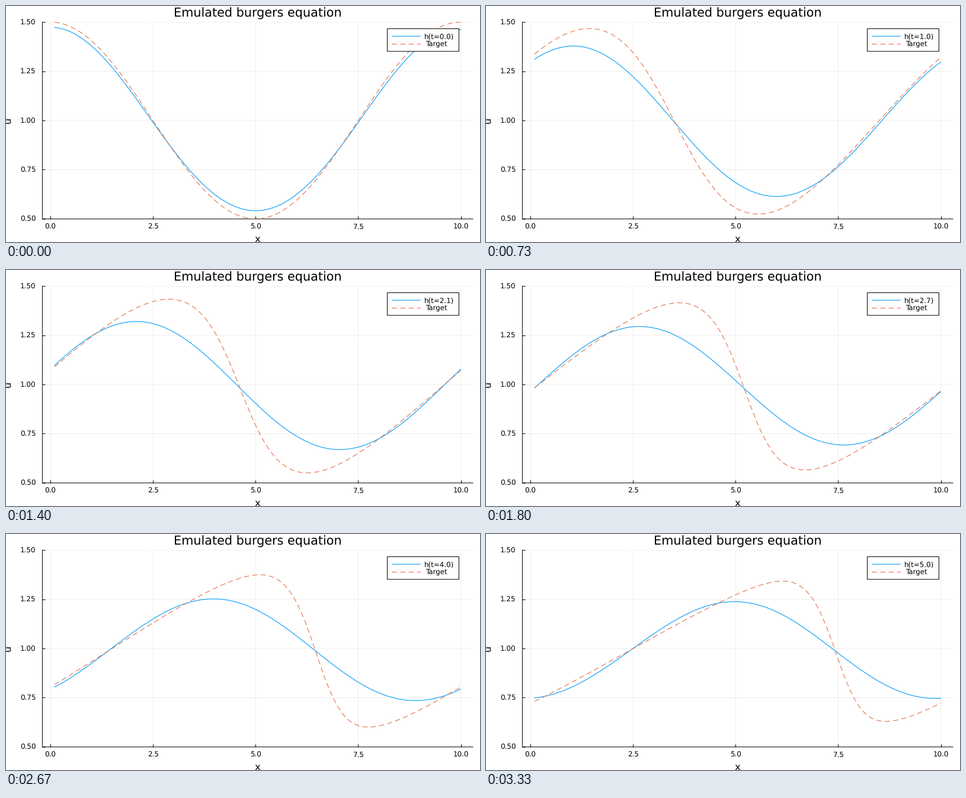
Recreate the animation shown at these times as a matplotlib script. Size 800 px wide and 400 px high, loop 3.39 s.

```python
import numpy as np
import matplotlib.pyplot as plt
from matplotlib.animation import FuncAnimation
from matplotlib.lines import Line2D
from matplotlib.patches import Rectangle
from matplotlib.transforms import Affine2D

W, H, DPI = 800, 400, 100
PX = 72 / DPI
LOOP_MS, FRAMES = 3390, 51
BLUE, ORANGE = "#009AFA", "#E36F47"
LEFT, RIGHT, TOP, BOTTOM = 61.4, 788.1, 27.2, 360.9
X_MIN, X_MAX = -0.197, 10.297
DASH = (0, (8, 4.9))

# Plain antialiased lines and glyphs, not aligned to the pixel grid
plt.rcParams.update({"font.family": "DejaVu Sans",
                     "path.snap": False,
                     "text.hinting": "none"})

DX = 0.1
x = DX * np.arange(1, 101)
k = 2 * np.pi / 10


def solve_burgers(nu=0.1, dt=0.002, substeps=50):
    """Periodic viscous Burgers equation, upwind advection."""
    u = 1 + 0.5 * np.cos(k * x)
    states = [u]
    for _ in range(FRAMES - 1):
        for _ in range(substeps):
            back, ahead = np.roll(u, 1), np.roll(u, -1)
            u = u + dt * (nu * (ahead - 2 * u + back) / DX**2
                          - u * (u - back) / DX)
        states.append(u)
    return states


# Emulated wave: mean, main harmonic and a weak second one, over time
KEYS = [0, 0.7, 1.5, 2.1, 3.3, 4, 5]
MEAN = [0.999, 0.9925, 0.9923, 0.9932, 0.992, 0.9928, 0.9905]
COS2 = [0.0088, 0, -0.0045, -0.0023, 0.0007, 0.0033, 0.0021]
SIN2 = [0, 0.007, 0, -0.001, -0.001, 0, 0.004]
AMP = np.polyfit(KEYS, [0.4665, 0.401, 0.3557, 0.3247, 0.2779, 0.2594, 0.2455], 4)
PHASE = np.polyfit(KEYS, np.radians([0, 26.2, 53.9, 74.5, 116.6, 141.5, 177.2]), 4)


def emulated(t):
    mean, c2, s2 = (np.interp(t, KEYS, v) for v in (MEAN, COS2, SIN2))
    u = mean + np.polyval(AMP, t) * np.cos(k * x - np.polyval(PHASE, t))
    u += c2 * np.cos(2 * k * x) + s2 * np.sin(2 * k * x)
    return u - 0.013 * np.exp(-4 * t - (10 - x) / 0.3)


target_states = solve_burgers()

fig = plt.figure(figsize=(W / DPI, H / DPI), dpi=DPI, facecolor="white")
pixels = Affine2D().scale(1 / W, -1 / H).translate(0, 1) + fig.transFigure


def label(px, py, text, size, **kw):
    kw.setdefault("va", "baseline")
    return fig.text(px, py, text, fontsize=size * PX, color="black",
                    transform=pixels, zorder=8, **kw)


ax = fig.add_axes([LEFT / W, 1 - BOTTOM / H, (RIGHT - LEFT) / W, (BOTTOM - TOP) / H])
ax.set_xlim(X_MIN, X_MAX)
ax.set_ylim(0.5, 1.5)
x_ticks = np.arange(0, 10.1, 2.5)
y_ticks = np.arange(0.5, 1.51, 0.25)
ax.set_xticks(x_ticks)
ax.set_yticks(y_ticks)
ax.tick_params(direction="in", length=5 * PX, width=PX,
               labelbottom=False, labelleft=False)
ax.set_axisbelow(True)
ax.grid(color="black", alpha=0.07, linewidth=PX)
for side, spine in ax.spines.items():
    spine.set_visible(side in ("left", "bottom"))
    spine.set_linewidth(PX)
    spine.set_zorder(1.5)

for v in x_ticks:
    px = LEFT + (v - X_MIN) / (X_MAX - X_MIN) * (RIGHT - LEFT)
    label(px, 378.3, f"{v:.1f}", 11.9, ha="center")
for v in y_ticks:
    label(50.5, BOTTOM - (v - 0.5) * (BOTTOM - TOP) + 4.4, f"{v:.2f}", 11.9, ha="right")

label(424.7, 18.5, "Emulated burgers equation", 20.8, ha="center")
label(424.7, 399.5, "x", 16.3, ha="center")
label(11.4, 194, "u", 16.3, rotation=90, ha="right", va="center")

blue_line, = ax.plot(x, emulated(0), color=BLUE, linewidth=1.1 * PX)
target_line, = ax.plot(x, target_states[0], color=ORANGE, linewidth=1.1 * PX,
                       linestyle=DASH, dash_capstyle="butt")

# Legend
fig.add_artist(Rectangle((643.5, 38.5), 121, 38.4, facecolor="white",
                         edgecolor="black", linewidth=PX,
                         transform=pixels, zorder=5))
for py, color, style in ((51.2, BLUE, "-"), (64.6, ORANGE, DASH)):
    fig.add_artist(Line2D([651, 700], [py, py], color=color, linestyle=style,
                          linewidth=1.1 * PX, transform=pixels, zorder=6,
                          solid_capstyle="butt", dash_capstyle="butt"))
time_text = label(705.7, 55.3, "h(t=0.0)", 11.9)
label(708.4, 68.8, "Target", 11.9)


def update(i):
    t = i / 10
    blue_line.set_ydata(emulated(t))
    target_line.set_ydata(target_states[i])
    time_text.set_text(f"h(t={t:.1f})")
    return blue_line, target_line, time_text


anim = FuncAnimation(fig, update, frames=FRAMES, interval=LOOP_MS / FRAMES,
                     repeat=True, repeat_delay=0, blit=False)
plt.show()
```
